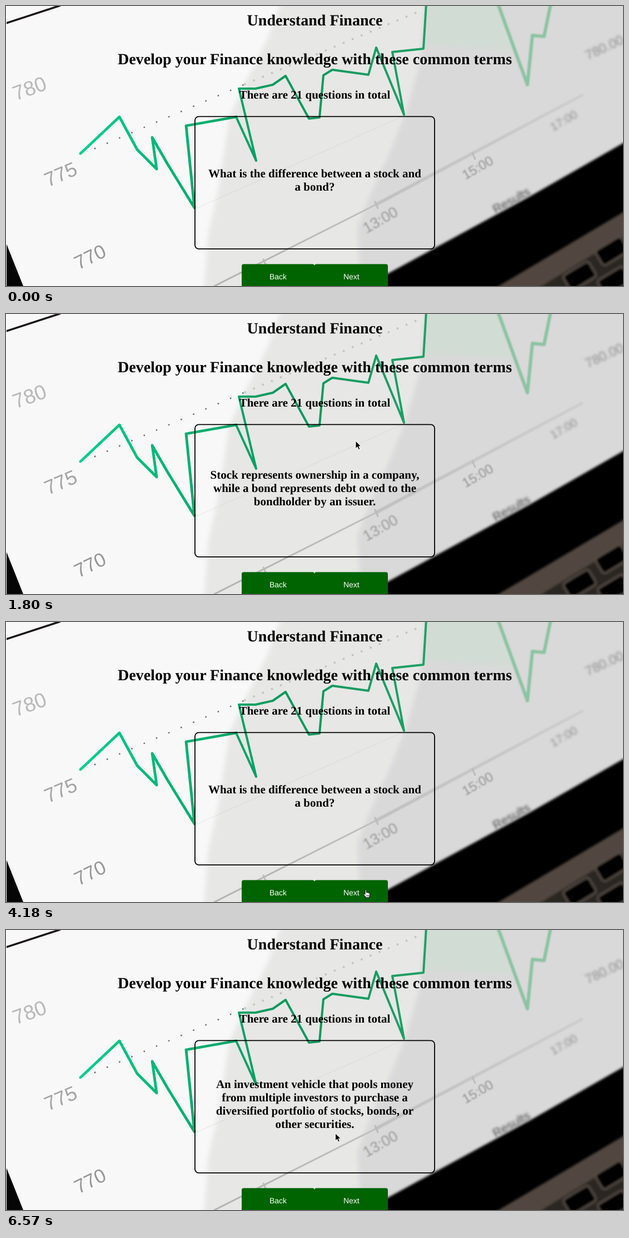
These frames come from a looping animation (1110x505 px, 8 s). An HTML page:

```html
<!DOCTYPE html>
<html lang="en">
<head>
<meta charset="utf-8">
<title>Finance flash cards</title>
<style>
  html, body { margin: 0; width: 100%; height: 100%; overflow: hidden; background: #f8f8f8; }
  svg { display: block; width: 100%; height: 100%; }
  text { text-rendering: geometricPrecision; }
  .heading { font: bold 28.06px "Liberation Serif", serif; }
  .card { font: bold 21px "Liberation Serif", serif; }
  .heading, .card, .button, .axis { text-anchor: middle; }
  .button { font: 14px "Liberation Sans", sans-serif; fill: #fff; }
  .axis { font-family: "Liberation Sans", sans-serif; }
  .line { fill: none; stroke-linejoin: round; stroke-linecap: round; }
</style>
</head>
<body>
<svg viewBox="0 0 1110 505">
  <defs>
    <linearGradient id="green" gradientUnits="userSpaceOnUse" x1="130" y1="0" x2="756" y2="0">
      <stop offset="0" stop-color="#00d38d"/>
      <stop offset=".25" stop-color="#00b573"/>
      <stop offset=".6" stop-color="#08995a"/>
      <stop offset="1" stop-color="#21a066"/>
    </linearGradient>
    <linearGradient id="axisTone" gradientUnits="userSpaceOnUse" x1="375" y1="505" x2="1040" y2="160">
      <stop offset="0" stop-color="#b2b2b1"/>
      <stop offset="1" stop-color="#cecece"/>
    </linearGradient>
    <filter id="soft1"><feGaussianBlur stdDeviation="1"/></filter>
    <filter id="soft2"><feGaussianBlur stdDeviation="2"/></filter>
    <filter id="soft4" x="-20%" width="140%"><feGaussianBlur stdDeviation="4"/></filter>
  </defs>

  <!-- Screen tones -->
  <rect width="1110" height="505" fill="#f8f8f8"/>
  <g filter="url(#soft4)">
    <path d="M500-20 470 60 435 130 402 200 388 290 380 340 364 410 355 525H1130V-20Z" fill="#e7e7e6"/>
    <path d="M755-20 745 100 720 190 690 265 655 340 632 400 640 525H1130V-20Z" fill="#d9d9d9"/>
    <path d="M756-20H880L915 80 756 70Z" fill="#cfded3" opacity=".7"/>
  </g>

  <!-- Screen edges and keyboard -->
  <path d="M0 31 98-1" stroke="#1a1414" stroke-width="3.5"/>
  <path d="M0 427 31 505H0Z" fill="#050505"/>
  <path d="M1130 236 945 342 690 481 640 510V525H1130Z" fill="#020202" filter="url(#soft2)"/>
  <g filter="url(#soft2)">
    <path d="M878 510 1115 369V510Z" fill="#51463f"/>
    <path d="M955 510 1115 412V510Z" fill="#2b2521"/>
    <g id="keys" fill="#060505" stroke="#5a5049" stroke-width="3"></g>
  </g>
  <rect width="1" height="505" fill="#fff"/>

  <!-- Chart -->
  <g class="line">
    <path d="M340 366 720 196" stroke="#c9c9c8" stroke-width="1.3" opacity=".35"/>
    <path d="M375 505 666 358" stroke="url(#axisTone)" stroke-width="3"/>
    <path d="M666 358 1036 161" stroke="url(#axisTone)" stroke-width="5.5" filter="url(#soft1)"/>
    <path d="M463 457l4 9M664 353l5 12M839 265l5 11" stroke="#bbb" stroke-width="3"/>
    <path d="M160 257 430 141" stroke="#636363" stroke-width="2.8" stroke-dasharray="0 24.15"/>
    <path d="M430 141 745 9" stroke="#c3c3c2" stroke-width="4" stroke-dasharray="0 17.5"/>
    <path d="M885-4 938 142 947 53 968 55 980-4" stroke="#8cc3a3" stroke-width="6" filter="url(#soft1)"/>
    <g stroke="url(#green)">
      <path d="M134 266 204 200 236 259 271 294 263 237 290 284 339 364 324 216 414 200" stroke-width="4.8"/>
      <path d="M414 200 450 279 419 149H449L480 142 503 126 545 203 564 201 571 125 587 115 652 124 666 75 716 196 695 83 751 77 756-4" stroke-width="4"/>
    </g>
  </g>
  <g id="labels" class="axis"></g>

  <!-- Page -->
  <text class="heading" x="555.5" y="35">Understand Finance</text>
  <text class="heading" x="555.5" y="105">Develop your Finance knowledge with these common terms</text>
  <text class="card" x="555.5" y="167">There are 21 questions in total</text>
  <rect x="339.9" y="199.4" width="431.2" height="238.7" rx="7" fill="none" stroke="#000" stroke-width="1.8"/>
  <g id="card" class="card"></g>
  <g fill="#006400">
    <rect x="424" y="465.5" width="131" height="50" rx="3.5"/>
    <rect x="555" y="465.5" width="132" height="50" rx="3.5"/>
  </g>
  <text class="button" x="489.5" y="492.5">Back</text>
  <text class="button" x="621.3" y="492.5">Next</text>

  <!-- Pointers -->
  <g id="arrow"><path d="M1 1V14.6L4.2 11.7 6.3 16.7 8.8 15.6 6.7 10.8H10.8Z" fill="#000" stroke="#fff"/></g>
  <g id="beam"><path d="M1 1Q3.5 1 3.5 3V12Q3.5 14 1 14M6 1Q3.5 1 3.5 3M3.5 12Q3.5 14 6 14M2 9H5" fill="none" stroke="#333"/></g>
  <g id="hand"><path d="M4 9.5V2Q4 .7 5.1 .7T6.3 2V6Q7.3 5 8.3 6.2 9.5 5.4 10.4 6.8 12.5 6.3 12.6 8.5V11Q12.3 13 11.3 15H5.5Q4.8 13 1.2 9.6 .7 8 2.3 7.9Z" fill="#fff" stroke="#000"/><path d="M6.9 10v3M8.8 10v3M10.6 10v3" stroke="#000" stroke-width=".7"/></g>
</svg>
<script>
const DURATION = 8000;
const SVG = "http://www.w3.org/2000/svg";
const byId = id => document.getElementById(id);

function add(parent, tag, attrs, text = "") {
  const node = document.createElementNS(SVG, tag);
  for (const [key, value] of Object.entries(attrs)) node.setAttribute(key, value);
  node.textContent = text;
  parent.append(node);
  return node;
}

// text, centre x, centre y, angle, size, colour, blur
const axisLabels = [
  ["780", 42, 148, -20, 37, "#b8b8b8", ""],
  ["775", 98, 303, -23, 36, "#a4a4a4", ""],
  ["770", 151, 452, -26, 35, "#969696", ""],
  ["13:00", 673, 385, -30, 27, "#9c9c9c", "soft1"],
  ["15:00", 848, 291, -30, 24, "#949494", "soft1"],
  ["17:00", 1003, 206, -30, 21, "#8f8f8f", "soft2"],
  ["780.00", 1076, 74, -25, 24, "#8f8f8f", "soft2"],
  ["Results", 909, 350, -29, 22, "#4c4c4c", "soft2"]
];
for (const [text, x, y, angle, size, fill, blur] of axisLabels) {
  const attrs = { transform: `translate(${x} ${y}) rotate(${angle})`, y: size * .36, "font-size": size, fill };
  if (blur) attrs.filter = `url(#${blur})`;
  add(byId("labels"), "text", attrs, text);
}

for (const [x, y] of [[1090, 442], [1032, 487], [1094, 496]]) {
  add(byId("keys"), "rect", { x: -27, y: -16, width: 54, height: 32, rx: 6, transform: `translate(${x} ${y}) rotate(-31)` });
}

const stockQuestion = ["What is the difference between a stock and", "a bond?"];
const cards = [
  [0, stockQuestion],
  [1050, ["Stock represents ownership in a company,", "while a bond represents debt owed to the", "bondholder by an issuer."]],
  [3440, stockQuestion],
  [5070, ["What is a mutual fund?"]],
  [6570, ["An investment vehicle that pools money", "from multiple investors to purchase a", "diversified portfolio of stocks, bonds, or", "other securities."]]
].map(([start, lines]) => {
  const group = add(byId("card"), "g", {});
  lines.forEach((line, i) => add(group, "text", { x: 555.5, y: 333 - 12 * lines.length + 24 * i }, line));
  return [start, group];
});

// start, shape, left, top
const pointerSteps = [
  [0, "none", 0, 0],
  [300, "arrow", 335, 179],
  [600, "arrow", 516, 251],
  [750, "arrow", 553, 283],
  [1050, "beam", 552, 279.5],
  [1500, "beam", 552, 278.5],
  [1650, "arrow", 625, 228],
  [1800, "arrow", 628, 228],
  [1940, "arrow", 640, 217],
  [2090, "arrow", 658, 206],
  [2240, "arrow", 672, 204],
  [4030, "arrow", 674, 302],
  [4180, "hand", 642, 482],
  [4480, "hand", 638, 482],
  [4630, "hand", 637, 482],
  [4770, "hand", 638, 481.5],
  [5370, "hand", 633, 470],
  [5520, "arrow", 591.5, 365.5]
];
const pointers = ["arrow", "beam", "hand"].map(byId);
const stepAt = (steps, time) => steps.findLast(([start]) => start <= time);

function draw(time) {
  const [, current] = stepAt(cards, time);
  for (const [, group] of cards) group.style.display = group === current ? "" : "none";
  const [, shape, x, y] = stepAt(pointerSteps, time);
  for (const pointer of pointers) {
    pointer.style.display = pointer.id === shape ? "" : "none";
    pointer.setAttribute("transform", `translate(${x} ${y})`);
  }
}

const begin = performance.now();
function tick() {
  draw((performance.now() - begin) % DURATION);
  requestAnimationFrame(tick);
}
tick();
</script>
</body>
</html>
```
